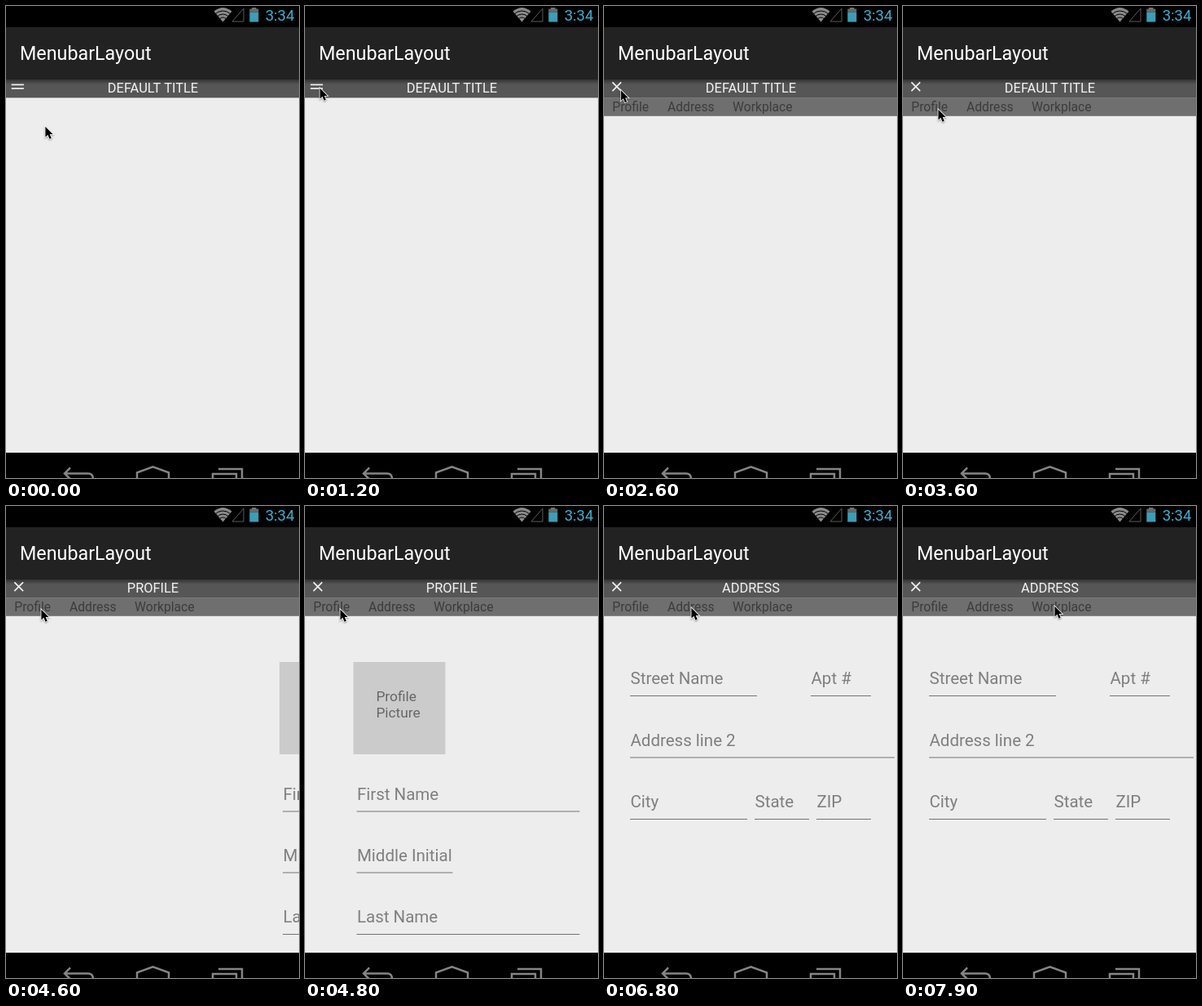
An HTML page with a canvas that plays this animation: 360 by 578 pixels, repeating every 8000 ms.

```html
<!DOCTYPE html>
<html lang="en">
<head>
<meta charset="utf-8">
<title>MenubarLayout</title>
<style>
  html, body { margin: 0; height: 100%; overflow: hidden; background: #000; }
  canvas { display: block; }
</style>
</head>
<body>
<canvas id="stage" width="360" height="578"></canvas>
<script>
const ctx = document.getElementById('stage').getContext('2d');
const LOOP = 8000, STEP = 100;
const BAR_TOP = 90, BAR_HEIGHT = 22.4;

const ease = (t, from, to) => {
  const p = Math.min(1, Math.max(0, (t - from) / (to - from)));
  return (1 - Math.cos(Math.PI * p)) / 2;
};

function rect(x, y, w, h, fill) {
  ctx.fillStyle = fill;
  ctx.fillRect(x, y, w, h);
}

function text(str, x, y, size, fill, align = 'left') {
  ctx.font = `${size}px Roboto, sans-serif`;
  ctx.textAlign = align;
  ctx.fillStyle = fill;
  ctx.fillText(str, x, y);
}

function stroke(path, color, width) {
  ctx.strokeStyle = color;
  ctx.lineWidth = width;
  ctx.stroke(new Path2D(path));
}

function fill(path, color) {
  ctx.fillStyle = color;
  ctx.fill(new Path2D(path));
}

// Runs a drawing function with the origin moved.
function at(x, y, draw) {
  ctx.save();
  ctx.translate(x, y);
  draw();
  ctx.restore();
}

function statusBar() {
  rect(0, 0, 360, 26, '#000');
  fill('M266.5 19.5L255.5 6.5Q266.5 -2.5 277.5 6.5Z', '#8a8a8a');
  for (const r of [5.5, 9.5, 13.5]) {
    ctx.beginPath();
    ctx.arc(266.5, 19.5, r, -Math.PI * 0.76, -Math.PI * 0.24);
    ctx.strokeStyle = '#000';
    ctx.lineWidth = 1;
    ctx.stroke();
  }
  stroke('M278 19H292V3Z', '#5c5c5c', 1);
  rect(302, 2, 5.5, 2, '#777');
  rect(299.3, 3.5, 11, 4, '#6a6a6a');
  rect(299.3, 7.5, 11, 12, '#3d9db5');
  text('3:34', 354.5, 18, 18.6, '#3cb0d2', 'right');
}

function navBar() {
  rect(0, 547, 360, 31, '#000');
  at(0, -0.6, () => {
    stroke('M79 566L72 573L79 580M72 573H101Q107 573 107 580', '#858585', 2.5);
    stroke('M161 580V572L180.5 565L200 572V580', '#858585', 2.5);
    stroke('M261 567.5H290V580M254 580V573.5H283V580', '#858585', 2.5);
  });
}

function field(label, x, y, width) {
  text(label, x + 0.5, y - 14, 20.5, '#7f7f7f');
  rect(x, y, width, 1, '#747474');
}

function profilePage() {
  rect(56, 191, 113, 113, '#cbcbcb');
  text('Profile', 84, 239, 17.3, '#666');
  text('Picture', 84, 259, 17.3, '#666');
  field('First Name', 60, 373.5, 274);
  field('Middle Initial', 60, 448.5, 118);
  field('Last Name', 60, 524, 274);
}

function addressPage() {
  field('Street Name', 32, 232, 156);
  field('Apt #', 254, 232, 74);
  field('Address line 2', 32, 307.5, 325);
  field('City', 32, 383, 144);
  field('State', 185, 383, 67);
  field('ZIP', 261, 383, 67);
}

function pages(t) {
  if (t > 4500 && t < 6500) {
    at(360 * (1 - ease(t, 4500, 4820)) - 360 * ease(t, 6200, 6500), 0, profilePage);
  }
  if (t >= 6500) at(360 * (1 - ease(t, 6480, 6790)), 0, addressPage);
}

function menuIcon(p) {
  for (const side of [-1, 1]) {
    at(14.3 + 1.4 * p, 98.7 + side * 2.3 * (1 - p), () => {
      ctx.rotate(-side * p * Math.PI / 4);
      rect(-7.6, -0.85, 15.2, 1.7, '#f0f0f0');
    });
  }
}

function menuBar(t) {
  rect(0, BAR_TOP, 360, BAR_HEIGHT, '#565656');
  const shadow = ctx.createLinearGradient(0, BAR_TOP, 0, BAR_TOP + 6);
  shadow.addColorStop(0, '#0006');
  shadow.addColorStop(1, '#0000');
  rect(0, BAR_TOP, 360, 6, shadow);
  const title = t < 4200 ? 'DEFAULT TITLE' : t < 6200 ? 'PROFILE' : 'ADDRESS';
  text(title, 180.5, 106, 16.4, '#f2f2f2', 'center');
  menuIcon(ease(t, 1750, 2150));
}

// The submenu fades in while it slides down over the title.
function subMenu(t) {
  const p = ease(t, 2050, 2480);
  if (!p) return;
  at(0, BAR_TOP + BAR_HEIGHT * p, () => {
    ctx.globalAlpha = p;
    rect(0, 0, 360, BAR_HEIGHT, 'rgba(0,0,0,.53)');
    ctx.globalAlpha = p * p;
    text('Profile', 10.3, 17, 15.7, '#3c3c3c');
    text('Address', 78, 17, 15.7, '#3c3c3c');
    text('Workplace', 158, 17, 15.7, '#3c3c3c');
  });
}

const moves = [
  [0, 400, 42, 136],
  [500, 900, 18, 100],
  [2500, 3000, 43, 126],
  [5200, 5800, 107, 124],
  [7500, 7900, 186, 122],
];
const clicks = [1700, 4100, 6100];

function pointer(t) {
  let x = 48, y = 147;
  for (const [from, to, toX, toY] of moves) {
    const p = ease(t, from, to);
    x += (toX - x) * p;
    y += (toY - y) * p;
  }
  at(x, y, () => {
    if (clicks.some(c => t >= c && t < c + 300)) {
      const glow = ctx.createRadialGradient(0, 0, 0, 0, 0, 14);
      glow.addColorStop(0, 'rgba(255,255,255,.95)');
      glow.addColorStop(0.6, 'rgba(232,230,246,.85)');
      glow.addColorStop(0.88, 'rgba(190,186,216,.7)');
      glow.addColorStop(1, 'rgba(190,186,216,0)');
      rect(-14, -14, 28, 28, glow);
    }
    ctx.translate(0.4, 0.8);
    ctx.scale(0.9, 0.9);
    ctx.shadowColor = '#0006';
    ctx.shadowBlur = 2;
    ctx.shadowOffsetY = 1;
    const arrow = 'M0 0V14L3.3 11L5.6 16.5L8.2 15.4L5.9 10.2H10.2Z';
    stroke(arrow, '#fff', 1.8);
    ctx.shadowColor = 'transparent';
    fill(arrow, '#000');
  });
}

function draw(now) {
  const t = Math.floor(now % LOOP / STEP) * STEP;
  rect(0, 0, 360, 578, '#ededed');
  pages(t);
  statusBar();
  rect(0, 26, 360, 64, '#222');
  text('MenubarLayout', 17, 66, 23.3, '#fff');
  menuBar(t);
  subMenu(t);
  navBar();
  pointer(t);
}

let start;
function tick(now) {
  start ??= now;
  draw(now - start);
  requestAnimationFrame(tick);
}
requestAnimationFrame(tick);
</script>
</body>
</html>
```
